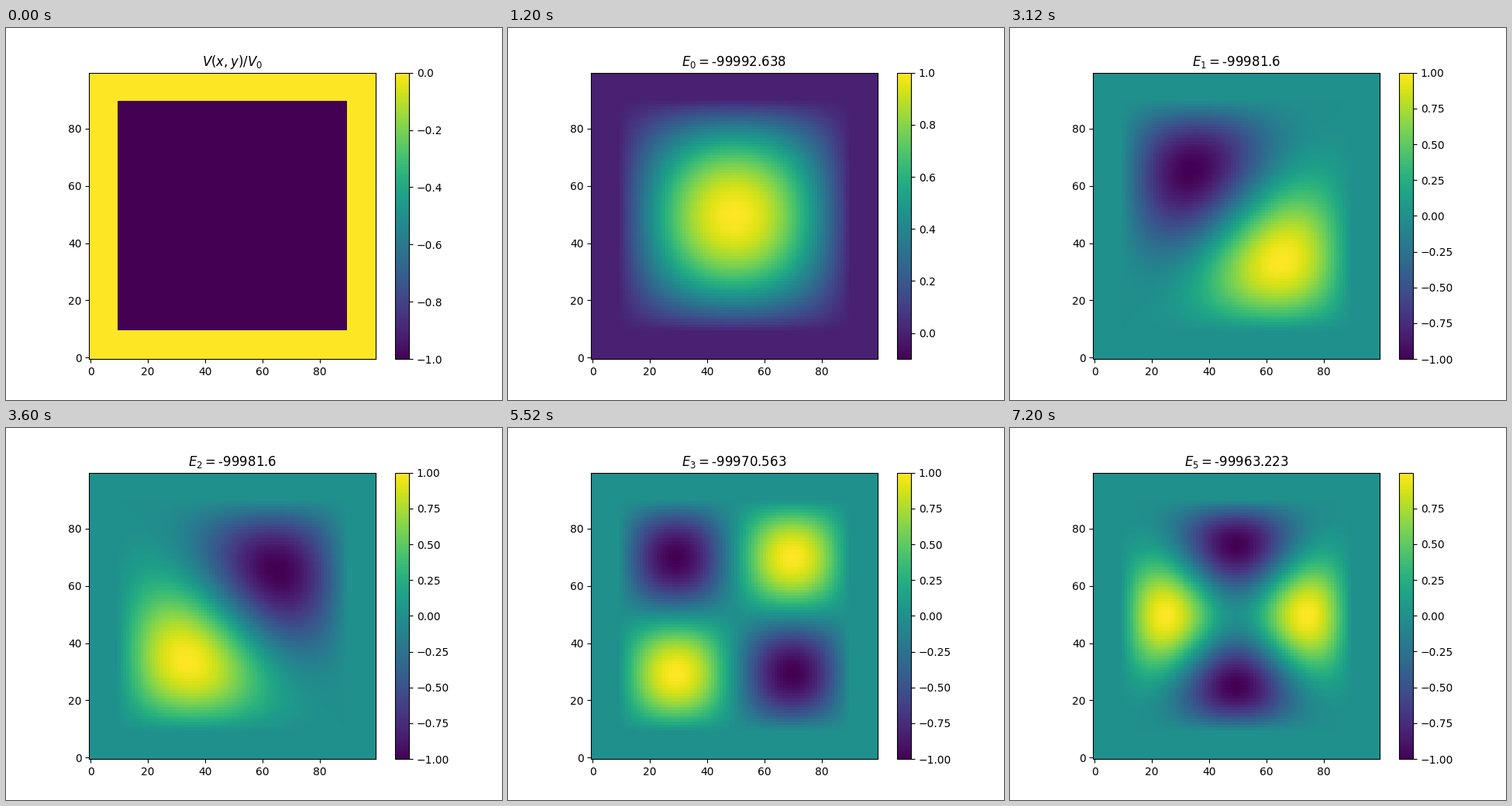
Write a matplotlib script that moves like this. It is 640x480 px and loops after 8000 ms.

```python
import numpy as np
import matplotlib.pyplot as plt
from matplotlib.animation import FuncAnimation

SIZE, WALL = 100, 10        # grid points per side, thickness of the barrier
STEP_MS, HOLD = 400, 3      # frame interval, frames per picture
N_FRAMES = 20

idx = np.arange(SIZE)
inside = (idx >= WALL) & (idx < SIZE - WALL)
phase = np.pi * (idx - WALL + 1) / (SIZE - 2 * WALL + 1)


def wave(n):
    return np.where(inside, np.sin(n * phase), 0.0)


def mode(nx, ny):
    """Product state of the square well, rows along y."""
    return np.outer(wave(ny), wave(nx))


def unit(field):
    return field / np.abs(field).max()


well = -np.outer(inside, inside).astype(float)
ring = -(mode(3, 1) + mode(1, 3))
cross = mode(3, 1) - mode(1, 3)

states = [
    (mode(1, 1), "-99992.638"),
    (mode(1, 2) - mode(2, 1), "-99981.6"),
    (mode(1, 2) + mode(2, 1), "-99981.6"),
    (mode(2, 2), "-99970.563"),
    (ring, "-99963.223"),
    (cross + 0.003 * ring, "-99963.223"),   # slight mixing of the degenerate pair
]
scenes = [(well, "$V(x,y)/V_0$")]
scenes += [(unit(f), f"$E_{n}=${energy}") for n, (f, energy) in enumerate(states)]

fig, ax = plt.subplots(figsize=(6.4, 4.8), dpi=100)
image = ax.imshow(well, origin="lower", cmap="viridis")
fig.colorbar(image, ax=ax)
title = ax.set_title("")


def update(frame):
    field, label = scenes[frame // HOLD]
    image.set_data(field)
    image.set_clim(field.min(), field.max())
    title.set_text(label)
    return image, title


anim = FuncAnimation(fig, update, frames=N_FRAMES, interval=STEP_MS,
                     repeat=True, repeat_delay=0, blit=False)
plt.show()
```
